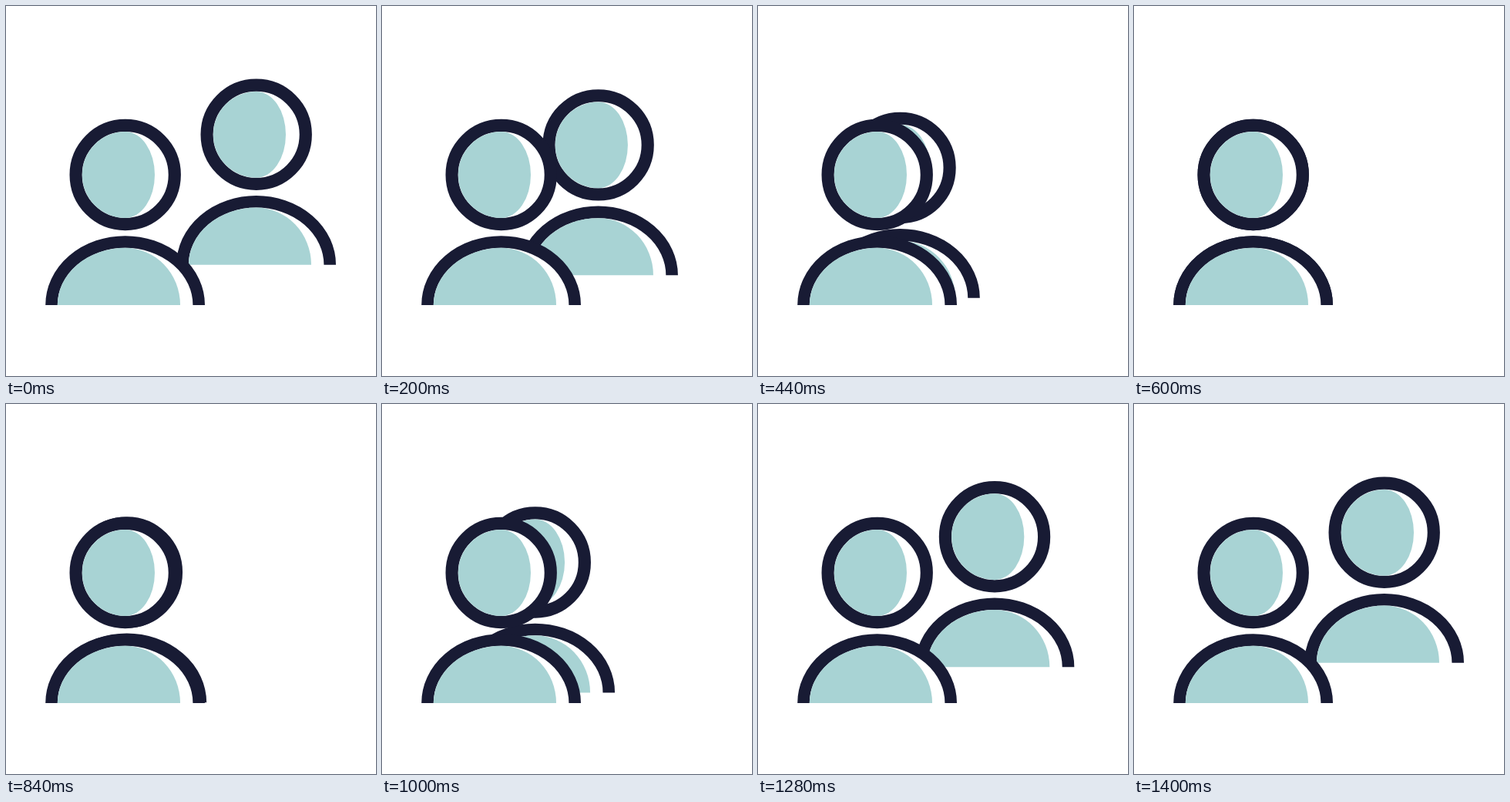
Write an HTML page that moves like this. It is 480 px wide and 480 px high and loops after 2.52 s.

```html
<!DOCTYPE html>
<html lang="en">
<head>
<meta charset="utf-8">
<title>Two people</title>
<style>
  html, body { margin: 0; width: 100%; height: 100%; overflow: hidden; background: #fff; }
  svg { display: block; width: 100vw; height: 100vh; }
  .line { fill: #fff; stroke: #181b34; }
  .tint { fill: #a8d3d4; }
</style>
</head>
<body>
<svg viewBox="0 0 480 480">
  <defs>
    <g id="person">
      <circle class="tint" cx="154.7" cy="219" r="57"/>
      <circle class="line" cx="154.7" cy="219" r="64.1" stroke-width="16.2"/>
      <path class="tint" d="M154.7 163.1 A55.9 55.9 0 0 0 154.7 274.9 A38.3 55.9 0 0 0 154.7 163.1Z"/>
      <path class="line" d="M59 388 A95.6 82 0 0 1 250.2 388" stroke-width="15.6"/>
      <path class="tint" d="M66.8 388 A87.8 74.2 0 0 1 154.6 313.8 A71.4 74.2 0 0 1 226 388Z"/>
    </g>
  </defs>
  <use id="back" href="#person"/>
  <use href="#person"/>
</svg>
<script>
  const LOOP = 2520, STEP = 40, MOVE = 600, RETURN_AT = 800;
  const SHIFT = { x: 170, y: -52.2 };
  const back = document.getElementById('back');
  const start = performance.now();

  const ease = (t) => {
    const u = Math.min(1, Math.max(0, t / MOVE));
    return u * u * (3 - 2 * u);
  };

  function draw(now) {
    const elapsed = Math.max(0, now - start) % LOOP;
    const t = Math.floor(elapsed / STEP) * STEP;
    const k = 1 - ease(t) + ease(t - RETURN_AT);
    back.setAttribute('transform', `translate(${SHIFT.x * k} ${SHIFT.y * k})`);
    requestAnimationFrame(draw);
  }
  draw(start);
</script>
</body>
</html>
```
